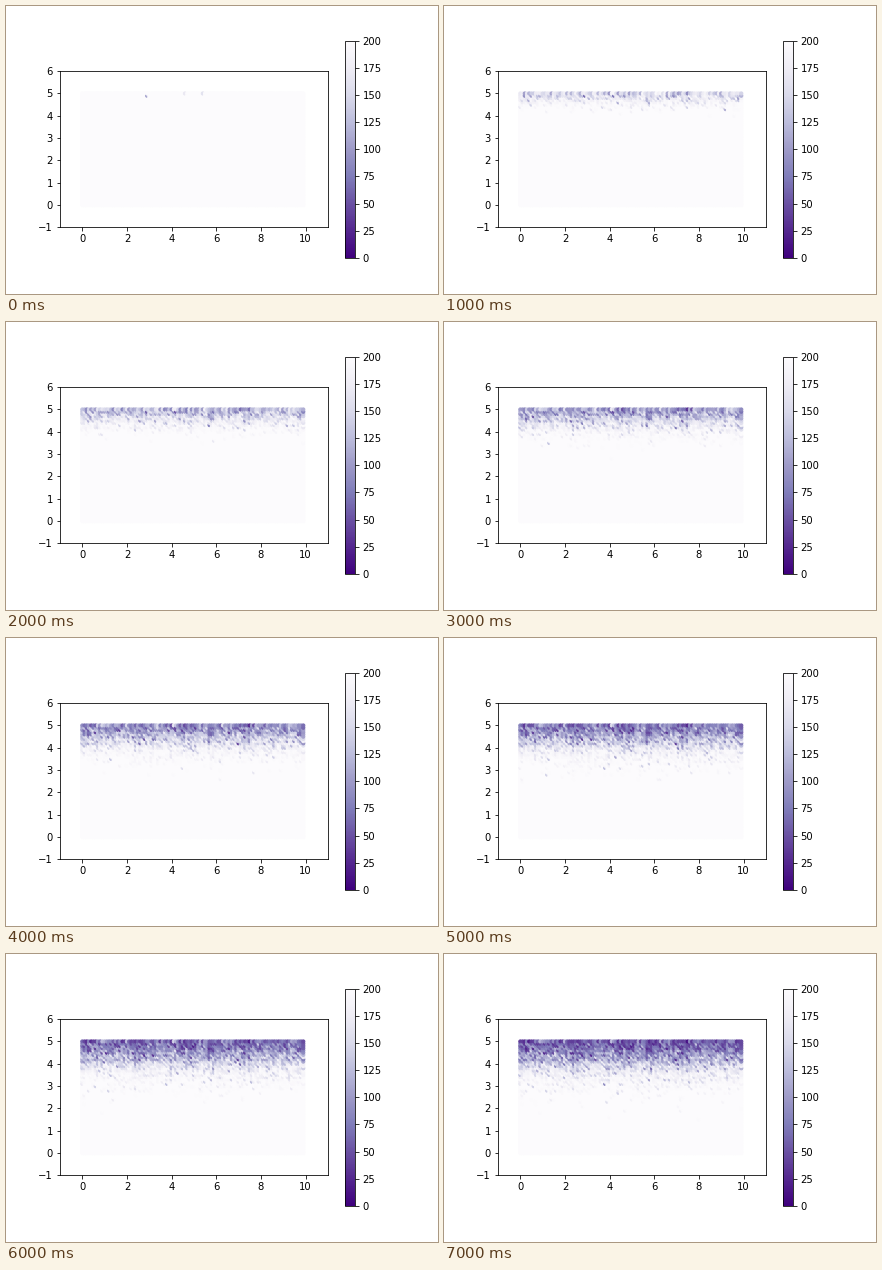
Animation of 432 by 288 pixels, one loop 8 s. Source, as a matplotlib script:

```python
import numpy as np
import matplotlib.pyplot as plt
from matplotlib.animation import FuncAnimation

FRAMES = 8
FULL = 200          # value of an untouched cell
STEP = 0.1
GRAIN = 8           # higher gives a smoother wear pattern

rng = np.random.default_rng(12)

# Columns left to right, each from the bottom up: later dots overlap earlier ones.
x, y = np.meshgrid(np.arange(100) * STEP, np.arange(51) * STEP, indexing="ij")
depth = 5 - y

# Some columns wear faster than others.
weak_spots = (0, 2.6, 4.8, 5.9, 7.3)
column_rate = 0.9 + sum(0.25 * np.exp(-((x - c) / 0.3) ** 2) for c in weak_spots)


def mean_wear(t):
    """Expected wear of every cell after t seconds."""
    if t == 0:
        return np.zeros_like(depth)
    reach = 0.33 * np.sqrt(t)
    return 0.28 * t ** 0.8 * np.exp(-(depth / reach) ** 1.6) * column_rate


def wear_history():
    """Cell values per frame; the wear only ever grows, in random jumps."""
    wear = np.zeros_like(depth)
    for col, row, value in ((29, 49, 110), (46, 50, 168), (54, 50, 160)):
        wear[col, row] = np.log(FULL / value)
    history = [FULL * np.exp(-wear)]
    for t in range(1, FRAMES):
        growth = mean_wear(t) - mean_wear(t - 1)
        wear = wear + rng.gamma(GRAIN * growth) / GRAIN
        history.append(FULL * np.exp(-wear))
    return history


values = wear_history()

fig, ax = plt.subplots(figsize=(6, 4), dpi=72)
fig.subplots_adjust(left=0.125, right=0.9, bottom=0.125, top=0.88)
dots = ax.scatter(x.ravel(), y.ravel(), s=10, c=values[0].ravel(),
                  cmap="Purples_r", vmin=0, vmax=FULL)
ax.set_aspect("equal")
ax.set(xlim=(-1, 11), ylim=(-1, 6),
       xticks=range(0, 11, 2), yticks=range(-1, 7))
fig.colorbar(dots, ax=ax, ticks=range(0, FULL + 1, 25))


def draw(frame):
    dots.set_array(values[frame].ravel())
    return (dots,)


anim = FuncAnimation(fig, draw, frames=FRAMES, interval=1000,
                     init_func=lambda: draw(0), repeat=True, repeat_delay=0)
plt.show()
```
